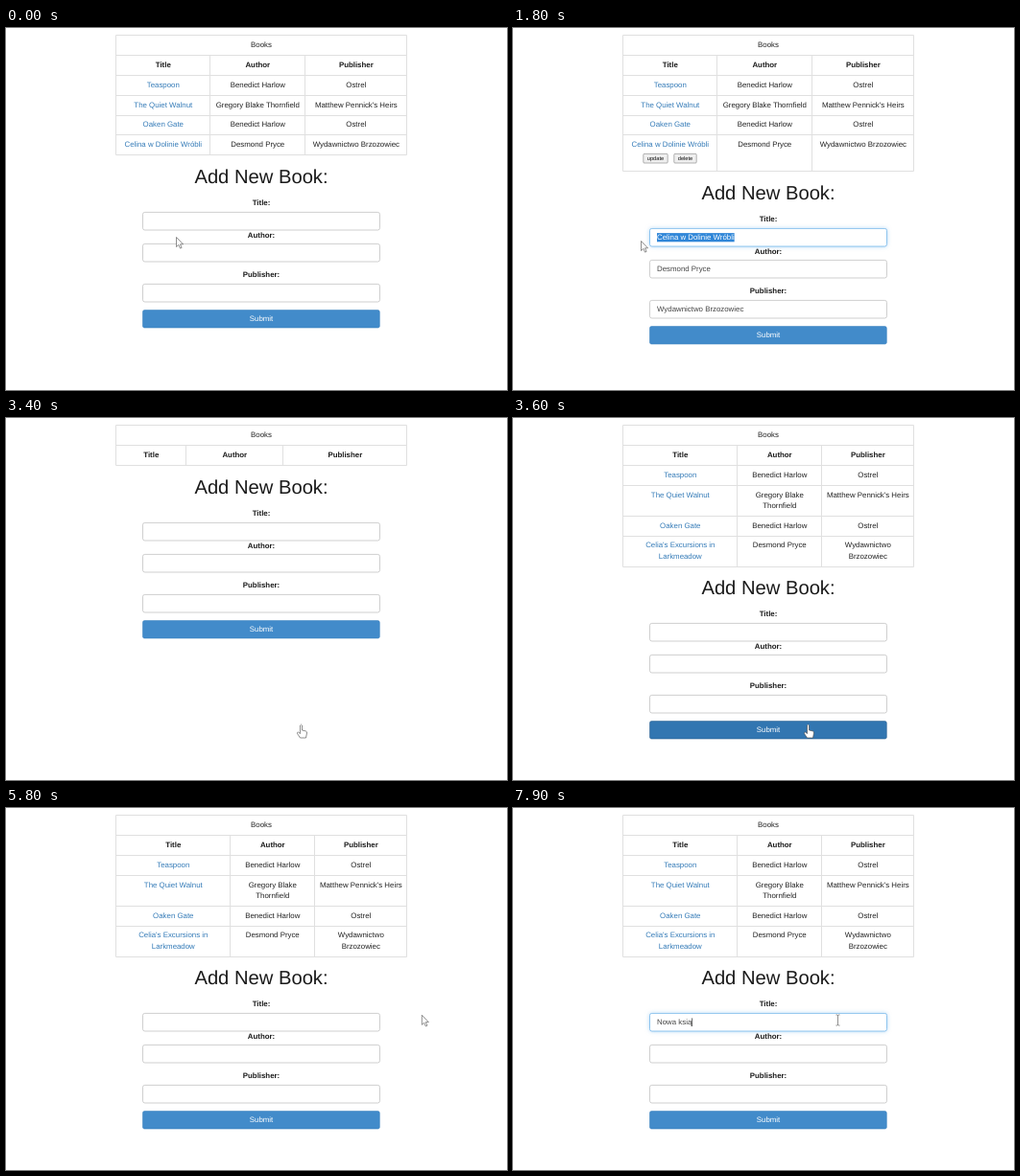
These frames come from a looping animation (522x378 px, 8000 ms). An HTML page:

```html
<!DOCTYPE html>
<html lang="en">
<head>
<meta charset="utf-8">
<title>Books</title>
<style>
  html, body { margin: 0; width: 100%; height: 100%; overflow: hidden; background: #fff; }
  svg { display: block; }
  text { font: 7.86px "Liberation Sans", Arial, sans-serif; fill: #222; text-anchor: middle;
         text-rendering: geometricPrecision; white-space: pre; }
  .bold { font-weight: bold; fill: #1a1a1a; }
  .head { font-size: 20.2px; fill: #1a1a1a; }
  .link { fill: #337ab7; }
  .value { fill: #444; text-anchor: start; }
  .white { fill: #fff; }
  .small { font-size: 5.7px; fill: #111; }
  .line { stroke: #e0e0e0; fill: none; }
  .input { fill: #fff; stroke: #bbb; stroke-width: .7; }
  .focus { stroke: #66afe9; filter: drop-shadow(0 0 2px rgba(102, 175, 233, .5)); }
  .selection { fill: #2f86d8; }
  .submit { fill: #428bca; stroke: #357ebd; stroke-width: .56; }
  .hover { fill: #3276b1; stroke: #285e8e; stroke-width: .56; }
  .button { fill: #efefef; stroke: #777; stroke-width: .56; }
  .cursor { fill: #fff; stroke: #444; stroke-width: .6; stroke-linejoin: round; }
  .squiggle { fill: none; stroke: #e05050; stroke-width: .6; }
</style>
</head>
<body>
<svg id="stage" width="522" height="378" viewBox="0 0 522 378"></svg>
<script>
const LOOP = 8000, STEP = 100;
const ROW = 20.8, LINE = 11.2, BUTTON_ROW = 16.8, TOP = 7.3, BASE = 12.8;
const LEFT = 114.5, RIGHT = 417.5, MIDDLE = 266, TEXT_X = 150;

const OLD_TITLE = 'Celina w Dolinie Wróbli';
const NEW_TITLE = "Celia's Excursions in|Larkmeadow";
const AUTHOR = 'Desmond Pryce';
const PUBLISHER = 'Wydawnictwo|Brzozowiec';
const books = [
  ['Teaspoon', 'Benedict Harlow', 'Ostrel'],
  ['The Quiet Walnut', 'Gregory Blake|Thornfield', "Matthew Pennick's Heirs"],
  ['Oaken Gate', 'Benedict Harlow', 'Ostrel']
];
const joined = s => s.replace('|', ' ');

// Moments at which the typed letters appear
const typed = 'Nowa ksią';
const keyTimes = [6700, 6900, 7000, 7200, 7400, 7600, 7700, 7800, 7900];

// Pointer path: time, x, y, shape from that time on
const path = [
  [0, 177.5, 218.5, 'arrow'], [400, 183, 121, 'hand'], [600, 183, 121, 'hand'],
  [900, 149, 136, 'arrow'], [1000, 149, 136, 'arrow'], [1300, 234, 218, 'beam'],
  [1800, 133.5, 222.5, 'arrow'], [2700, 133.5, 222.5, 'arrow'], [3000, 307, 305.5, 'arrow'],
  [3200, 307.5, 320, 'hand'], [3700, 307.5, 320, 'hand'], [4100, 440, 230, 'arrow'],
  [4200, 440, 230, 'arrow'], [4300, 457, 215, 'arrow'], [5700, 457, 215, 'arrow'],
  [6200, 338.5, 221.5, 'beam'], [LOOP, 338.5, 221.5, 'beam']
];
const shapes = {
  arrow: 'M0 0V10L2.3 7.9 4 11.6 5.6 10.9 4 7.3H7Z',
  hand: 'M-1 1Q0-.8 1 1V6L5 7Q6.2 7.4 6 9L5 14H-1L-4 9.5Q-4.2 8 -3 8L-1 9.5Z',
  beam: 'M-2-5.5H-.6L0-5 .6-5.5H2M0-5V5M-2 5.5H-.6L0 5 .6 5.5H2'
};

const stage = document.getElementById('stage');
const pen = document.createElement('canvas').getContext('2d');
pen.font = '78.6px "Liberation Sans", Arial, sans-serif';
const width = s => pen.measureText(s).width / 10;

const text = (x, y, s, cls = '') => `<text x="${x}" y="${y}" class="${cls}">${s}</text>`;
const rect = (x, y, w, h, cls, r = 0) =>
  `<rect x="${x}" y="${y}" width="${w}" height="${h}" rx="${r}" class="${cls}"/>`;
const line = d => `<path d="${d}" class="line"/>`;
const snap = y => Math.round(y) + .5;

function pointer(t) {
  const i = path.findIndex((key, n) => t >= key[0] && t < path[n + 1][0]);
  const [t0, x0, y0, shape] = path[i], [t1, x1, y1] = path[i + 1];
  const p = (t - t0) / (t1 - t0);
  return { x: x0 + (x1 - x0) * p, y: y0 + (y1 - y0) * p, shape };
}

function table(t) {
  const empty = t === 500 || t === 3400, renamed = t >= 3500;
  const buttons = t >= 600 && t < 3400;
  const inner = empty ? [187.5, 288.5] : renamed ? [233.5, 321.5] : [212.5, 311.5];
  const edges = [LEFT, ...inner, RIGHT];
  const center = c => (edges[c] + edges[c + 1]) / 2 + .3;
  const last = [renamed ? NEW_TITLE : OLD_TITLE, AUTHOR, PUBLISHER];
  const rows = empty ? [] : [...books, last];
  let y = TOP + ROW;
  let out = line(`M${LEFT} ${snap(TOP)}H${RIGHT}M${LEFT} ${snap(y)}H${RIGHT}`);
  out += text(MIDDLE, TOP + BASE, 'Books');
  ['Title', 'Author', 'Publisher'].forEach((s, c) => out += text(center(c), y + BASE, s, 'bold'));
  y += ROW;
  for (const row of rows) {
    out += line(`M${LEFT} ${snap(y)}H${RIGHT}`);
    let lines = 1;
    row.forEach((cell, c) => {
      const parts = (renamed ? cell : joined(cell)).split('|');
      lines = Math.max(lines, parts.length);
      parts.forEach((s, n) => out += text(center(c), y + BASE + n * LINE, s, c ? '' : 'link'));
    });
    y += ROW + (lines - 1) * LINE;
  }
  if (buttons) {
    out += rect(135.8, 131.4, 25.4, 9.6, 'button', 1) + text(148.5, 138, 'update', 'small');
    out += rect(167.8, 131.4, 23.4, 9.6, 'button', 1) + text(179.5, 138, 'delete', 'small');
    y += BUTTON_ROW;
  }
  const bottom = snap(y);
  out += line(`M${LEFT} ${bottom}H${RIGHT}M${LEFT} ${snap(TOP)}V${bottom}M${RIGHT} ${snap(TOP)}V${bottom}`);
  out += line(inner.map(x => `M${x} ${snap(TOP + ROW)}V${bottom}`).join(''));
  return { out, shift: Math.round(y - TOP - 6 * ROW) };
}

function squiggle(x, y, w) {
  let d = `M${x} ${y}`;
  for (let i = 1; i * 1.2 < w; i++) d += `L${x + i * 1.2} ${y + i % 2}`;
  return `<path d="${d}" class="squiggle"/>`;
}

function titleText(t, y, mouse) {
  const editing = t >= 2000 && t < 3400;
  const count = keyTimes.filter(k => t >= k).length;
  const s = editing ? joined(NEW_TITLE) : t >= 1000 && t < 2000 ? OLD_TITLE : typed.slice(0, count);
  let out = '';
  if (t >= 1400 && t < 2000) {
    let k = 0;
    while (k < s.length && width(s.slice(0, k)) < mouse.x - TEXT_X) k++;
    const from = width(s.slice(0, k));
    out += rect(TEXT_X + from, y - 7, width(s) - from, 9.2, 'selection');
    out += text(TEXT_X, y, `${s.slice(0, k)}<tspan class="white">${s.slice(k)}</tspan>`, 'value');
  } else out += text(TEXT_X, y, s, 'value');
  if (editing || t >= 6600) out += rect(TEXT_X + width(s) + .2, y - 6.7, .6, 8.6, '');
  if (editing && t >= 2400) {
    const words = s.split(' '), end = words[words.length - 1];
    out += squiggle(TEXT_X, y + 1.6, width(words[0]));
    out += squiggle(TEXT_X + width(s) - width(end), y + 1.6, width(end));
  }
  return out;
}

function form(t, shift, mouse) {
  const filled = t >= 1000 && t < 3400;
  const focused = t >= 1400 && t < 3400 || t >= 6200;
  const field = (label, labelY, y, cls = '') =>
    text(MIDDLE, labelY + shift, label, 'bold') + rect(142.5, y + shift, 247, 18.6, 'input ' + cls, 2.2);
  const submitY = 294.6 + shift;
  const hover = mouse.shape === 'hand' && mouse.y > submitY && mouse.y < submitY + 19;
  let out = text(MIDDLE, 161.9 + shift, 'Add New Book:', 'head');
  out += field('Title:', 185.4, 192.4, focused ? 'focus' : '');
  out += field('Author:', 218.6, 225.4) + field('Publisher:', 259.9, 267.4);
  out += titleText(t, 204.1 + shift, mouse);
  if (filled) {
    out += text(TEXT_X, 237.2 + shift, AUTHOR, 'value');
    out += text(TEXT_X, 279 + shift, joined(PUBLISHER), 'value');
  }
  out += rect(142.5, submitY, 246.8, 18.4, hover ? 'hover' : 'submit', 1.8);
  return out + text(MIDDLE, 305.5 + shift, 'Submit', 'white');
}

function draw(t) {
  const mouse = pointer(t), { out, shift } = table(t);
  stage.innerHTML = out + form(t, shift, mouse) +
    `<path d="${shapes[mouse.shape]}" transform="translate(${mouse.x} ${mouse.y})" class="cursor"/>`;
}

const start = performance.now();
let shown = -1;
function tick() {
  const t = Math.floor((performance.now() - start) % LOOP / STEP) * STEP;
  if (t !== shown) draw(shown = t);
  requestAnimationFrame(tick);
}
tick();
</script>
</body>
</html>
```
